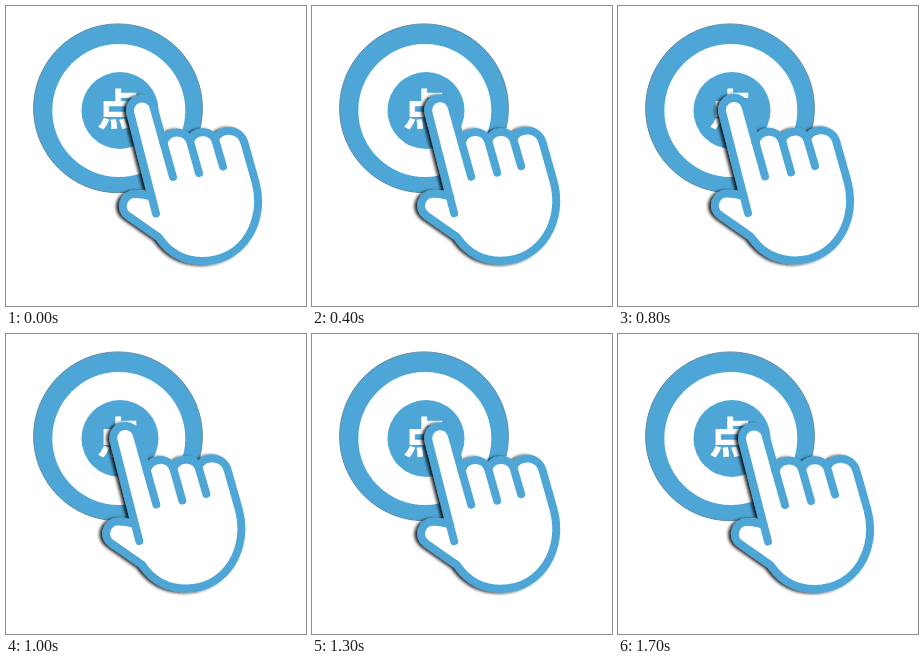
Write an HTML page that moves like this. It is 300 px wide and 300 px high and loops after 1800 ms.

```html
<!DOCTYPE html>
<html lang="zh-CN">
<head>
<meta charset="utf-8">
<title>点</title>
<style>
  html, body { margin: 0; width: 100%; height: 100%; overflow: hidden; background: #fff; }
  svg { display: block; width: 100vw; height: 100vh; }
  text { font: 900 42px "Noto Sans CJK SC", "Noto Sans CJK", sans-serif; }
</style>
</head>
<body>
<svg viewBox="0 0 300 300">
  <defs>
    <filter id="shadow" x="-20%" y="-20%" width="140%" height="140%">
      <feDropShadow dx="-2.8" dy=".6" stdDeviation="1.8" flood-color="#000" flood-opacity=".85"/>
    </filter>
  </defs>

  <!-- button -->
  <circle cx="112" cy="102.3" r="84.4" fill="#4ea6d6" stroke="#5f8ba5" stroke-width="1"/>
  <circle cx="112.8" cy="104.5" r="66.5" fill="#fff"/>
  <circle cx="114" cy="104.5" r="38.5" fill="#4ea6d6"/>
  <text x="112.5" y="119" text-anchor="middle" fill="#fff" stroke="#fff" stroke-width=".6">点</text>

  <!-- hand -->
  <g id="hand" filter="url(#shadow)" stroke="#4ea6d6" stroke-width="8"
     stroke-linecap="round" stroke-linejoin="round">
    <path fill="#fff" d="M145.7 191 L124.4 107.6 A12 12 0 0 1 147.6 101.4 L157.5 137
      A14 14 0 0 1 184 135 A14 14 0 0 1 209 133 A16 16 0 0 1 238.5 137
      L249.5 176 C260 214 238 255 197 255 C178 255 164 247 154 233
      Q153 231 151 230 L122.3 210 A12 12 0 0 1 129 188 C136 188 141 189 145.7 191 Z"/>
    <path fill="none" d="M145.7 191 L150 207.5 M157.5 137 L167 171
      M184 135 L193 167 M209 133 L217 160.5"/>
  </g>
</svg>
<script>
  const hand = document.getElementById("hand");
  const LOOP = 1800, STEP = 100, STEPS = 8, REACH = 20;

  // Steps left, holds at the far end, then retraces the same steps.
  function draw(time) {
    const tick = Math.floor((time % LOOP) / STEP);
    const pos = Math.min(tick, STEPS, 2 * STEPS + 1 - tick) / STEPS;
    const x = -REACH * Math.pow(pos, 1.35);
    hand.setAttribute("transform", `translate(${x.toFixed(2)} ${(-0.6 * pos).toFixed(2)})`);
  }

  const start = performance.now();
  function loop() {
    draw(performance.now() - start);
    requestAnimationFrame(loop);
  }
  loop();
</script>
</body>
</html>
```
